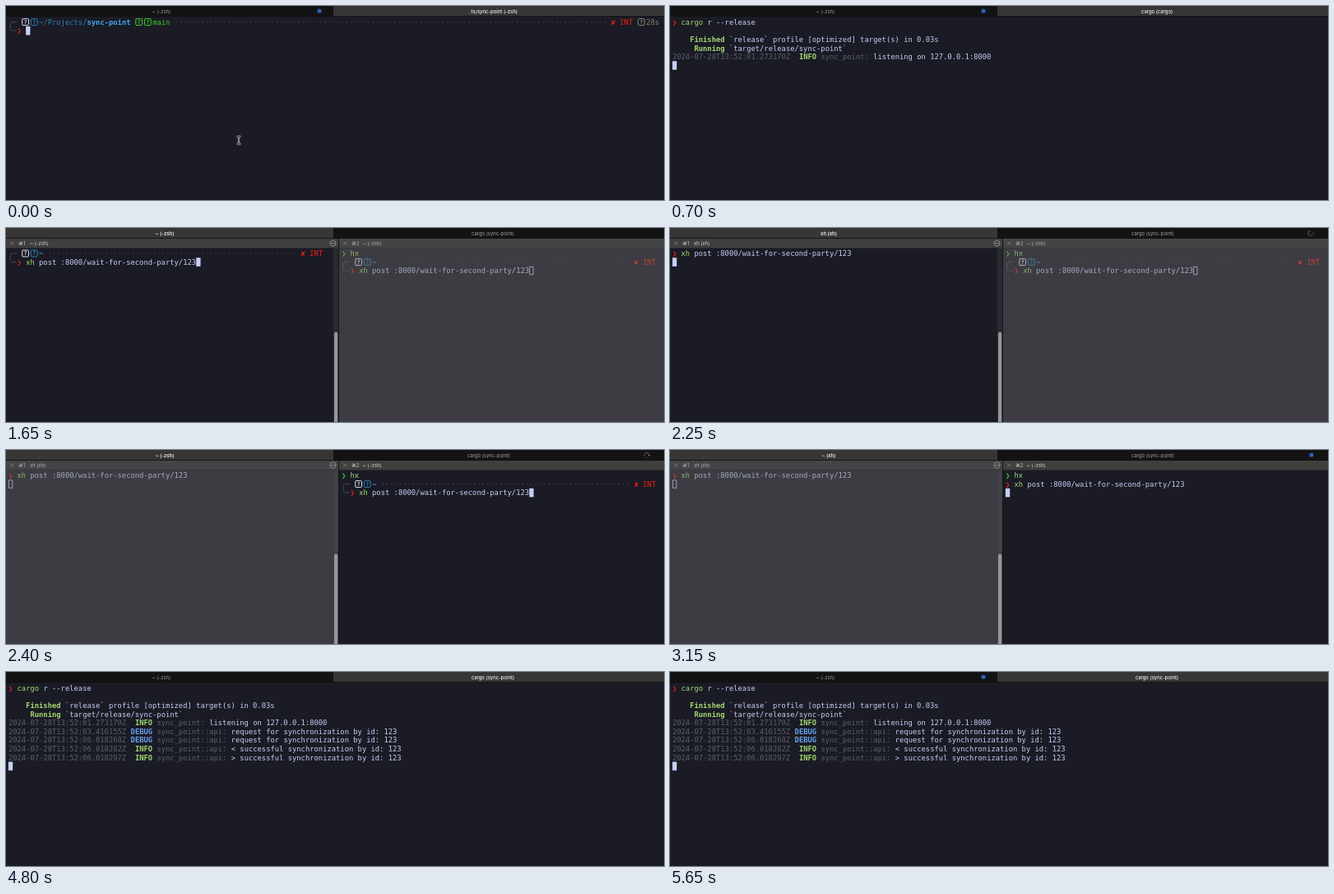
An HTML page with a canvas for the animation above (5.7 s loop, 800 px wide and 237 px high).

```html
<!DOCTYPE html>
<html lang="en">
<head>
<meta charset="utf-8">
<title>Two terminals</title>
<style>
  html, body { margin: 0; width: 100%; height: 100%; overflow: hidden; background: #1a1b25; }
  canvas { display: block; width: 800px; height: 237px; }
</style>
</head>
<body>
<canvas id="stage" width="800" height="237"></canvas>
<script>
const ctx = document.getElementById('stage').getContext('2d');
const W = 800, H = 237, LOOP = 5700;
const CELL = 5.31, ROW = 10.6, PAD = 2.9;
const MONO = '"DejaVu Sans Mono", monospace';
const SANS = 'Inter, "DejaVu Sans", sans-serif';
const CMD = 'xh post :8000/wait-for-second-party/123';

const C = {
  bg: '#1a1b25', fg: '#c6d0f5', green: '#a4d971', ok: '#3fd42a', red: '#ee2010',
  dir: '#2c83b3', anchor: '#45a6f3', frame: '#45474e', dots: '#52545d',
  dim: '#5c5f6e', blue: '#68a4ee', cyan: '#93cdf2', olive: '#85866a', icon: '#dde1ef'
};

// Times in ms at which the session moves on
const T = {
  type: 50, enter: 500, listen: 650, split: 750, named: 1300, first: 1800,
  spin: 1850, focus: 2350, dot: 2700, second: 2950, reply: 3350, back: 4100, unread: 4900
};

function rect(x, y, w, h, color) {
  ctx.fillStyle = color;
  ctx.fillRect(x, y, w, h);
}

function disc(x, y, r, color) {
  ctx.fillStyle = color;
  ctx.beginPath();
  ctx.arc(x, y, r, 0, Math.PI * 2);
  ctx.fill();
}

function stroke(color, width, draw) {
  ctx.strokeStyle = color;
  ctx.lineWidth = width;
  ctx.beginPath();
  draw();
  ctx.stroke();
}

function label(str, x, y, color, align = 'left', weight = 400) {
  ctx.font = `${weight} 5.9px ${SANS}`;
  ctx.textAlign = align;
  ctx.fillStyle = color;
  ctx.fillText(str, x, y + 2.1);
}

// A grid of character cells; row 0 is centred on y
function grid(x, y) {
  const px = col => x + PAD + col * CELL;
  const py = row => y + row * ROW;

  function text(row, col, str, color, bold) {
    ctx.font = `${bold ? 'bold ' : ''}8.82px ${MONO}`;
    ctx.textAlign = 'left';
    ctx.fillStyle = color;
    ctx.fillText(str, px(col), py(row) + 3.1);
  }

  // Each span is [text, color, bold]
  function spans(row, col, list) {
    for (const [str, color, bold] of list) {
      text(row, col, str, color, bold);
      col += str.length;
    }
  }

  function icon(row, col, color) {
    const left = px(col) + .9, top = py(row) - 4;
    stroke(color, 1, () => ctx.roundRect(left, top, 7.8, 8, 1.2));
    ctx.font = `bold 6.4px ${MONO}`;
    ctx.textAlign = 'center';
    ctx.fillStyle = color;
    ctx.fillText('?', left + 3.9, top + 6.4);
  }

  function dots(row, from, to) {
    for (let c = from; c <= to; c++) rect(px(c) + 2.1, py(row) - .5, 1.1, 1.1, C.dots);
  }

  function cursor(row, col, active) {
    const left = px(col), top = py(row) - 5.3;
    if (active) rect(left, top, CELL, ROW, C.fg);
    else stroke(C.fg, .9, () => ctx.rect(left + .5, top + .5, CELL - 1, ROW - 1));
  }

  function frame(row, color) {
    const l = px(0) + 2.2, a = py(row), b = py(row + 1);
    stroke(C.frame, 1, () => {
      ctx.moveTo(px(2) - .5, a);
      ctx.lineTo(l + 3, a);
      ctx.quadraticCurveTo(l, a, l, a + 3);
      ctx.lineTo(l, b - 3);
      ctx.quadraticCurveTo(l, b, l + 3, b);
      ctx.lineTo(px(2) - .5, b);
    });
    text(row + 1, 2, '❯', color, true);
    icon(row, 3, C.icon);
    icon(row, 5, C.dir);
  }

  function failed(row, col) {
    text(row, col, '✘', C.red);
    text(row, col + 2, 'INT', C.red);
  }

  function command(row, col, str, split) {
    spans(row, col, [[str.slice(0, split), C.green], [str.slice(split), C.fg]]);
  }

  return { text, spans, icon, dots, cursor, frame, failed, command };
}

function spinner(x, y, t) {
  const head = Math.floor(t / 50);
  for (let i = 0; i < 8; i++) {
    const a = i * Math.PI / 4, age = (head - i + 800) % 8;
    const dx = Math.cos(a), dy = Math.sin(a);
    stroke(`rgba(205,205,205,${.85 - age * .09})`, .8, () => {
      ctx.moveTo(x + dx * 2, y + dy * 2);
      ctx.lineTo(x + dx * 4, y + dy * 4);
    });
  }
}

function tabs(t, split) {
  const active = '#383634', idle = '#131313';
  rect(0, 0, 398, 12.5, split ? active : idle);
  rect(398, 0, 402, 12.5, split ? idle : active);
  rect(0, 12, W, .7, '#0c0c0e');

  let one = '~ (-zsh)';
  if (t >= T.first && t < T.focus) one = 'xh (xh)';
  else if (t >= T.second && t < T.reply + 50) one = '~ (xh)';
  const two = t < T.enter ? '..ts/sync-point (-zsh)'
    : t < T.named ? 'cargo (cargo)' : 'cargo (sync-point)';

  const busy = split && t >= T.spin;
  label(one, split ? 193 : 189, 6.5, split ? '#f2f2f2' : '#999', 'center', split ? 600 : 400);
  label(two, busy ? 587 : 592, 6.5, split ? '#a3a3a3' : '#f2f2f2', 'center', split ? 400 : 500);

  if (busy) {
    if (t >= T.dot && t < T.reply) disc(780, 6, 2.6, '#2b62bd');
    else spinner(779, 6.5, t);
  }
  if (!split && (t < T.split || t >= T.unread)) disc(381, 6, 2.6, '#2b62bd');
}

function server(t) {
  const g = grid(0, 19.6);
  const run = 'cargo r --release';

  if (t < T.enter) {
    const n = t < T.type ? 0 : Math.min(run.length, 3 * (Math.floor((t - T.type) / 50) + 1));
    g.frame(0, C.red);
    g.spans(0, 7, [['~/Projects/', C.dir], ['sync-point', C.anchor, true]]);
    g.icon(0, 29, C.ok);
    g.icon(0, 31, C.ok);
    g.text(0, 33, 'main', C.ok);
    g.dots(0, 38, 136);
    g.failed(0, 138);
    g.icon(0, 144, C.olive);
    g.text(0, 146, '28s', C.olive);
    g.command(1, 4, run.slice(0, n), 5);
    g.cursor(1, 4 + n, true);
    if (n === 0) pointer(283, 164);
    return;
  }

  g.text(0, 0, '❯', C.red, true);
  g.command(0, 2, run, 5);
  if (t < T.listen) {
    g.cursor(1, 0, true);
    return;
  }

  g.spans(2, 4, [['Finished', C.green, true],
    [' `release` profile [optimized] target(s) in 0.03s', C.fg]]);
  g.spans(3, 5, [['Running', C.green, true], [' `target/release/sync-point`', C.fg]]);

  const ask = 'request for synchronization by id: 123';
  const done = 'successful synchronization by id: 123';
  const log = [['01.273170', 'INFO', '', 'listening on 127.0.0.1:8000']];
  if (t >= T.back) log.push(
    ['03.416155', 'DEBUG', '::api', ask],
    ['06.018268', 'DEBUG', '::api', ask],
    ['06.018282', 'INFO', '::api', '< ' + done],
    ['06.018297', 'INFO', '::api', '> ' + done]);
  log.forEach(([sec, level, path, msg], i) => g.spans(4 + i, 0, [
    [`2024-07-28T13:52:${sec}Z `, C.dim],
    [level.padStart(5), level === 'INFO' ? C.green : C.blue, true],
    [` sync_point${path}: `, C.dim],
    [msg, C.fg]
  ]));
  g.cursor(4 + log.length, 0, true);
}

function pointer(x, y) {
  const beam = () => {
    ctx.moveTo(x - 2.5, y - 4.5);
    ctx.lineTo(x + 2.5, y - 4.5);
    ctx.moveTo(x, y - 4.5);
    ctx.lineTo(x, y + 4.5);
    ctx.moveTo(x - 2.5, y + 4.5);
    ctx.lineTo(x + 2.5, y + 4.5);
  };
  stroke('#c9c9c9', 2.2, beam);
  stroke('#22232b', .8, beam);
}

function client(x, top, sent, t, active) {
  const g = grid(x, 31);
  if (top) {
    g.text(0, 0, '❯', C.ok, true);
    g.text(0, 2, 'hx', C.green);
  }
  if (t < sent) {
    g.frame(top, C.red);
    g.text(top, 7, '~', C.anchor);
    g.dots(top, 9, 65);
    g.failed(top, 67);
    g.command(top + 1, 4, CMD, 2);
    g.cursor(top + 1, 4 + CMD.length, active);
    return;
  }
  g.text(top, 0, '❯', C.red, true);
  g.command(top, 2, CMD, 2);
  if (t < T.reply) {
    g.cursor(top + 1, 0, active);
    return;
  }
  g.spans(top + 1, 0, [['HTTP', C.blue], ['/', C.fg], ['1.1 200 ', C.blue], ['OK', C.cyan]]);
  g.spans(top + 2, 0, [['Content-Length', C.cyan], [': 0', C.fg]]);
  g.spans(top + 3, 0, [['Date', C.cyan], [': Sun, 28 Jul 2024 13:52:06 GMT', C.fg]]);
  g.frame(top + 6, C.ok);
  g.text(top + 6, 7, '~', C.anchor);
  g.dots(top + 6, 9, 71);
  g.cursor(top + 7, 4, active);
}

function paneBar(x, w, num, title, active) {
  rect(x, 12.7, w, 11.8, active ? '#403f3e' : '#454547');
  stroke('#8b8b8b', .7, () => {
    ctx.moveTo(x + 5, 16.3);
    ctx.lineTo(x + 9.5, 20.8);
    ctx.moveTo(x + 9.5, 16.3);
    ctx.lineTo(x + 5, 20.8);
  });
  const color = active ? '#d0d0d0' : '#b3b3b3';
  label('⌘' + num, x + 15, 18.6, color);
  label(title, x + 29, 18.6, color);
}

function panes(t) {
  const left = t < T.focus;
  const waiting = t >= T.first && t < T.reply + 50;
  client(0, 0, T.first, t, left);
  client(405, 1, T.second, t, !left);

  const veil = 'rgba(110,110,110,.4)';
  if (left) rect(405, 24.5, 395, H, veil);
  else rect(0, 24.5, 398, H, veil);

  rect(398, 24.5, 7, H, left ? '#292a30' : '#414146');
  rect(404, 12.7, 1, H, '#151518');
  ctx.fillStyle = '#97979b';
  ctx.beginPath();
  ctx.roundRect(399, 127, 4.2, 120, 2.1);
  ctx.fill();

  paneBar(0, 404, 1, waiting ? 'xh (xh)' : '~ (-zsh)', left);
  paneBar(405, 395, 2, '~ (-zsh)', !left);
  stroke('#a5a5a5', .7, () => {
    ctx.arc(397.5, 18.6, 3.5, 0, Math.PI * 2);
    ctx.moveTo(394.5, 18.6);
    ctx.lineTo(400.5, 18.6);
  });
}

function draw(now) {
  const t = now % LOOP;
  const split = t >= T.split && t < T.back;
  rect(0, 0, W, H, C.bg);
  if (split) panes(t);
  else server(t);
  tabs(t, split);
}

let start;
function tick(now) {
  start ??= now;
  draw(now - start);
  requestAnimationFrame(tick);
}
draw(0);
requestAnimationFrame(tick);
</script>
</body>
</html>
```
